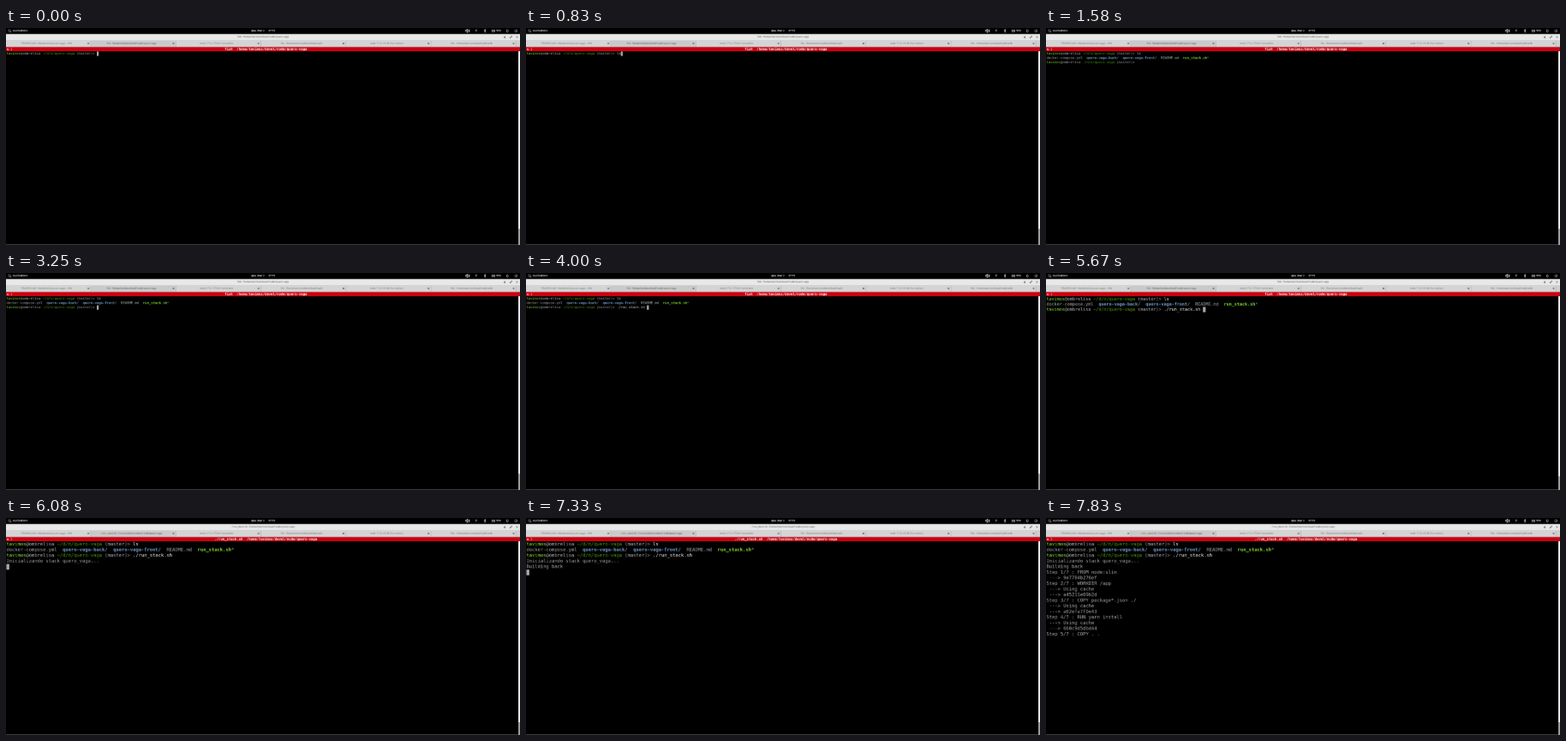
Animation of 600x253 px, one loop 8 s. Source, as an HTML page with a canvas:

```html
<!DOCTYPE html>
<html lang="pt-BR">
<head>
<meta charset="utf-8">
<title>Terminal</title>
<style>
html, body { margin: 0; width: 100%; height: 100%; overflow: hidden; background: #000; }
canvas { display: block; width: 600px; height: 253px; }
</style>
</head>
<body>
<canvas id="stage" width="600" height="253"></canvas>
<script>
const LOOP = 8000, W = 2560, H = 1080;
const BAR_TOP = 95, BAR_BOTTOM = 116, TEXT_LEFT = 2, TEXT_TOP = 117;
const MONO = '"DejaVu Sans Mono", monospace', SANS = '"Open Sans", sans-serif';
const ADVANCE = 0.602;
const FG = '#aaaaaa', WHITE = '#eeeeec', GREEN = '#4e9a06', LIME = '#8ae234', BLUE = '#729fcf', DIM = '#666666';
const PATH = '/home/tavimos/devel/node/quero-vaga';

// The desktop is drawn at full size, then reduced onto the stage.
const desk = Object.assign(document.createElement('canvas'), { width: W, height: H });
const g = desk.getContext('2d');
const view = document.getElementById('stage').getContext('2d');
view.imageSmoothingQuality = 'high';

// A line is a list of runs: [text, colour, bold].
const plain = text => [[text, FG]];
const prompt = (input, hint = '') => [
  ['tavimos', LIME], ['@ombrelisa ', FG], ['~/d/n/quero-vaga', GREEN],
  [' (master)> ', FG], [input, WHITE], [hint, DIM]
];
const listing = [
  ['docker-compose.yml  ', FG], ['quero-vaga-back', BLUE, true], ['/  ', FG],
  ['quero-vaga-front', BLUE, true], ['/  README.md  ', FG], ['run_stack.sh', LIME, true], ['*', FG]
];
const listed = [prompt('ls'), listing];
const started = [...listed, prompt('./run_stack.sh'), plain('Inicializando stack quero_vaga...')];
const building = [...started, plain('Building back')];
const built = [...building, ...[
  'Step 1/7 : FROM node:slim', ' ---> 9a7784b276ef',
  'Step 2/7 : WORKDIR /app', ' ---> Using cache', ' ---> a45211e69b2d',
  'Step 3/7 : COPY package*.json ./', ' ---> Using cache', ' ---> a62efa7f0e43',
  'Step 4/7 : RUN yarn install', ' ---> Using cache', ' ---> 660c9d5dbd44',
  'Step 5/7 : COPY . .'
].map(plain)];

const zoom = (cellW, cellH, thumb) => ({ cellW, cellH, thumb });
const on = { cursor: true }, off = { cursor: false };

// Each step changes part of the state from its time on.
const steps = [
  [0, { log: [], input: '', hint: '', shell: true, job: 'fish', ...on, ...zoom(10, 22, 1000) }],
  [170, { input: 'l' }],
  [420, { input: 'ls' }],
  [920, { log: listed, input: '' }],
  [1500, off],
  [2080, on],
  [2670, off],
  [3250, on],
  [3330, { input: '.', hint: '/run_stack.sh' }],
  [3670, { input: './', hint: 'run_stack.sh' }],
  [3830, { input: './r', hint: 'un_stack.sh' }],
  [3920, { input: './run_stack.sh ', hint: '' }],
  [4500, off],
  [4920, on],
  [5330, zoom(11, 23, 1004)],
  [5500, zoom(12, 25, 1008)],
  [5670, zoom(13, 26, 1012)],
  [5830, zoom(14, 28, 1016)],
  [6000, { log: started, shell: false, job: './run_stack.sh' }],
  [6500, off],
  [6920, on],
  [7250, { log: building }],
  [7500, { log: built }],
  [7830, off]
];

function box(x, y, w, h, color) {
  g.fillStyle = color;
  g.fillRect(x, y, w, h);
}

function label(text, x, y, size, color, align = 'center', weight = 400, family = SANS) {
  g.font = `${weight} ${size}px ${family}`;
  g.textAlign = align;
  g.textBaseline = 'middle';
  g.fillStyle = color;
  g.fillText(text, x, y);
}

function stroke(d, x, y, color, width = 2) {
  g.save();
  g.translate(x, y);
  g.strokeStyle = color;
  g.lineWidth = width;
  g.stroke(new Path2D(d));
  g.restore();
}

function drawPanel() {
  box(0, 0, W, 30, '#000');
  stroke('M-1-1m-5 0a5 5 0 1 0 10 0a5 5 0 1 0-10 0M3 3L8 8', 18, 14, '#eee');
  label('Applications', 33, 14, 12.5, '#fff', 'left', 600);
  label('qua, mar 3', 1254, 14, 12.5, '#fff', 'center', 600);
  label('07:19', 1324, 14, 12.5, '#fff', 'center', 600);
  stroke('M-8-3h4l5-5v16l-5-5h-4zM5-4q3 4 0 8M8-7q5 7 0 14', 2298, 14, '#eee', 2.5);
  stroke('M0-5L0 6M-5 0L0-6L5 0', 2342, 14, '#aaa');
  stroke('M-4-4L4 4L0 8V-8L4-4L-4 4', 2385, 14, '#ddd');
  stroke('M-8-4h15v8h-15zM-5 0h8', 2428, 14, '#ddd');
  label('96%', 2453, 14, 12, '#fff', 'center', 600);
  stroke('M-5 4h10M-4 4v-6q4-8 8 0v6M-1 8h2', 2497, 14, '#ccc');
  stroke('M-5-4a6 6 0 1 0 10 0M0-8v7', 2540, 14, '#ddd');
}

function drawWindow(job) {
  const title = `${job}  ${PATH}`;
  box(0, 30, W, 32, '#e8e8e8');
  label(title, 1280, 45, 12.5, '#555');
  stroke('M0-6V3M-4-1L0 3L4-1M-5 6H5', 2484, 45, '#555');
  stroke('M-5 5L5-5M0-5H5V0M-5 0V5H0', 2515, 45, '#555');
  stroke('M-4-4L4 4M4-4L-4 4', 2545, 45, '#666');

  const tabs = [
    'README.md (~/devel/node/quero-vaga) - VIM', title, 'node 17-21 07:46 /home/devs',
    'fish  /home/tavimos/devel/node/web', 'node 17-21 07:46 /home/devs', 'fish  /home/tavimos/devel/node/web'
  ];
  const tabW = 423.5;
  box(0, 62, W, 33, '#cfcfcf');
  tabs.forEach((text, i) => {
    const x = i * tabW, active = i === 1;
    box(x, 64, tabW - 2, 29, active ? '#cacaca' : '#d4d4d4');
    box(x + tabW - 2, 64, 2, 29, '#aaa');
    label(text, x + tabW / 2 - 10, 77, 12, active ? '#555' : '#777');
    stroke('M-4-4L4 4M4-4L-4 4', x + tabW - 13, 77, '#555');
  });
  box(0, 62, W, 1, '#aaa');
  box(0, 94, W, 1, '#999');

  box(0, BAR_TOP, W, BAR_BOTTOM - BAR_TOP, '#cc0010');
  label(title, 1294, 106, 10 / ADVANCE, '#fff', 'center', 700, MONO);
  stroke('M-4-2L0 3L4-2', 9, 106, '#fff', 3);
  stroke('M0-7V7', 27, 106, '#e88', 3);
}

function drawTerminal({ log, input, hint, shell, cursor, cellW, cellH, thumb }) {
  const lines = shell ? [...log, prompt(input, hint)] : log;
  const size = cellW / ADVANCE;
  lines.forEach((runs, row) => {
    let column = 0;
    for (const [text, color, bold] of runs) {
      const x = TEXT_LEFT + column * cellW, y = TEXT_TOP + (row + 0.5) * cellH;
      label(text, x, y, size, color, 'left', bold ? 700 : 400, MONO);
      column += text.length;
    }
  });
  if (cursor) {
    const column = shell ? prompt(input).reduce((n, [text]) => n + text.length, 0) : 0;
    box(TEXT_LEFT + column * cellW, TEXT_TOP + log.length * cellH, cellW, cellH, FG);
  }
  box(0, H - 4, W, 4, '#3c3c3c');
  box(2552, BAR_BOTTOM, 8, H - BAR_BOTTOM, '#ececec');
  box(2552, thumb, 8, H - thumb, '#a0a0a0');
}

function draw(state) {
  box(0, 0, W, H, '#000');
  drawPanel();
  drawWindow(state.job);
  drawTerminal(state);
  view.drawImage(desk, 0, 0, 600, 253);
}

let shown = 0;
function tick(now) {
  const time = now % LOOP;
  const past = steps.filter(([start]) => start <= time);
  if (past.length !== shown) {
    shown = past.length;
    draw(Object.assign({}, ...past.map(([, change]) => change)));
  }
  requestAnimationFrame(tick);
}
tick(performance.now());
</script>
</body>
</html>
```
